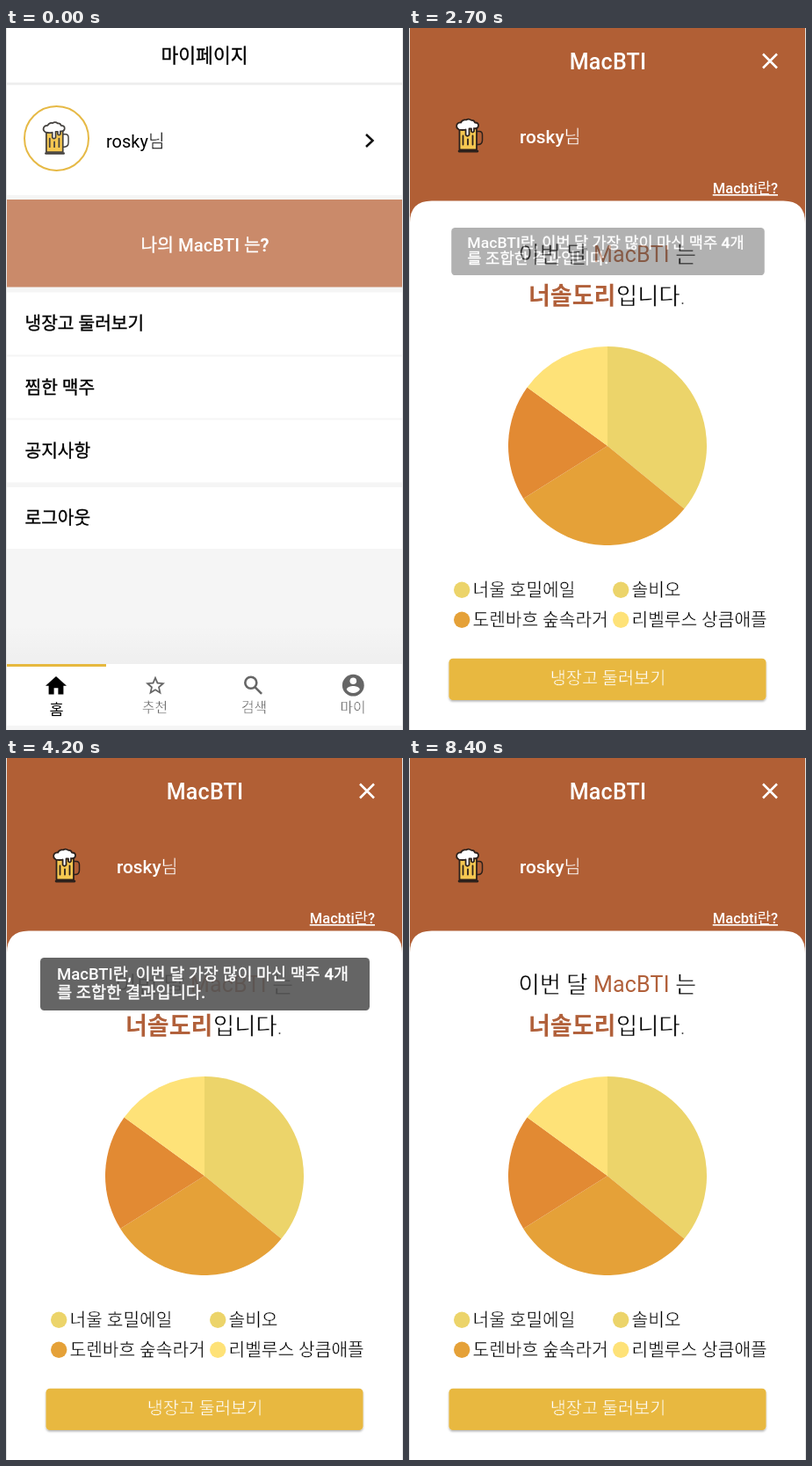
These frames come from a looping animation (452 by 798 pixels, 8.9 s). An HTML page:

```html
<!DOCTYPE html>
<html lang="ko">
<head>
<meta charset="utf-8">
<title>마이페이지</title>
<style>
html, body { margin: 0; width: 100%; height: 100%; overflow: hidden; background: #fff; }
svg { display: block; width: 452px; height: 798px; }
text { font-family: Roboto, "Noto Sans CJK KR", "Noto Sans CJK JP", sans-serif; font-size: 20.3px; }
.mid { text-anchor: middle; }
.end { text-anchor: end; }
/* a stroke in the background colour thins the strokes of the letters */
.light { font-weight: 300; stroke: var(--bg, #fff); stroke-width: .45px; }
.med { font-weight: 500; stroke: currentColor; stroke-width: .35px; }
.plain { stroke: none; }
.white { fill: #fff; color: #fff; }
.brown { fill: #b1603a; }
.big { font-size: 26.3px; }
.lat { font-size: 25px; letter-spacing: .2px; }
.nav { font-size: 15.8px; fill: #555; }
.line { fill: none; stroke: #fff; stroke-width: 2.5; }
</style>
</head>
<body>
<svg viewBox="0 0 452 798">
  <defs>
    <linearGradient id="shade" x2="0" y2="1">
      <stop offset="0" stop-color="#000" stop-opacity="0"/>
      <stop offset="1" stop-color="#000" stop-opacity=".025"/>
    </linearGradient>
    <filter id="drop" x="-5%" y="-20%" width="110%" height="150%">
      <feDropShadow dx="0" dy="1.6" stdDeviation="1.3" flood-opacity=".3"/>
    </filter>
    <symbol id="mug" viewBox="0 0 32 40" overflow="visible">
      <g stroke="currentColor" stroke-width="1.8" stroke-linejoin="round" stroke-linecap="round">
        <path d="M24 15h3q3.500 0 3.500 4v6q0 5-5 5H24" fill="none" stroke-width="1.500"/>
        <path d="M4.500 10h19.500v26H4.500z" fill="#f6c851"/>
        <path d="M4 37.600h21" stroke-width="2.600"/>
        <path d="M8.500 20v10M14 24v6M19.500 20v10" stroke-width="1.800"/>
        <path d="M4 13Q0 11 1.600 7Q3 4.600 6 5Q8 1 12 2Q15 0 18 2.400Q21 2 22 5Q26.500 5 26 9Q25 12.500 21 11.500V15Q19.500 17 18 15V12H15.500V19Q13.500 21.500 11.600 19V13Q8 14 4 13Z" fill="#fff"/>
      </g>
    </symbol>
  </defs>

  <g id="home">
    <rect width="452" height="798" fill="#f5f5f5"/>
    <path d="M1 0h450v62H1zM1 65h450v125H1zM1 300.500h450v71H1zM1 373.500h450v70H1zM1 445.500h450v71H1zM1 522h450v70H1z" fill="#fff"/>
    <rect x="1" y="62" width="450" height="2.500" fill="#eee"/>
    <rect x="1" y="678" width="450" height="45" fill="url(#shade)"/>
    <rect x="1" y="723" width="450" height="70" fill="#fff"/>
    <rect x="1" y="195" width="450" height="99.500" fill="#ca8a6a"/>
    <rect x="1" y="723" width="113" height="3" fill="#e6b83e"/>

    <text class="mid med" x="226" y="38.500" style="font-size:21.500px">마이페이지</text>
    <circle cx="57.500" cy="125.500" r="36.500" fill="none" stroke="#e6b945" stroke-width="2"/>
    <use href="#mug" x="41.500" y="106" width="31" height="39" color="#45423f"/>
    <text class="light" x="114" y="135.500"><tspan class="plain" font-weight="400" font-size="20">rosky</tspan>님</text>
    <path class="line" d="M410 121l7.500 7-7.500 7" style="stroke:#111"/>
    <text class="mid med white" x="226.500" y="253.500">나의 <tspan class="plain">MacBTI</tspan> 는?</text>
    <g class="med">
      <text x="21.500" y="342.500">냉장고 둘러보기</text>
      <text x="21.500" y="415.500">찜한 맥주</text>
      <text x="21.500" y="487.500">공지사항</text>
      <text x="21.500" y="563.500">로그아웃</text>
    </g>

    <path transform="translate(42.600 733.400) scale(1.2)" d="M10 20V14H14V20H19V12H22L12 3L2 12H5V20Z"/>
    <g fill="#666">
      <path transform="translate(156.800 734.300) scale(1.1)" d="M12 15.400L8.240 17.660L9.230 13.380L5.910 10.500L10.290 10.130L12 6.090L13.710 10.130L18.090 10.500L14.770 13.380L15.760 17.660ZM22 9.240L14.810 8.630L12 2L9.190 8.630L2 9.240L7.450 13.970L5.820 21L12 17.270L18.180 21L16.540 13.970Z" fill-rule="evenodd"/>
      <g fill="none" stroke="#666" stroke-width="2.600">
        <circle cx="278.800" cy="744.300" r="6.500"/>
        <path d="M283.600 749.300l7.500 7.500"/>
      </g>
      <circle cx="395.300" cy="747.200" r="12.400"/>
    </g>
    <circle cx="395.300" cy="742.200" r="3.800" fill="#fff"/>
    <path d="M387.800 752c0-2.500 5-3.900 7.500-3.900s7.500 1.400 7.500 3.900a9 9 0 0 1-15 0z" fill="#fff"/>
    <text class="mid" x="57.500" y="780.500" style="font-size:17.500px">홈</text>
    <g class="mid light">
      <text class="nav" x="169.500" y="777.500">추천</text>
      <text class="nav" x="282.500" y="777.500">검색</text>
      <text class="nav" x="395" y="777.500">마이</text>
    </g>
  </g>

  <g id="result">
    <rect width="452" height="798" fill="#fff"/>
    <rect x="1" width="450" height="240" fill="#b15f35"/>
    <path d="M1 798V221.500q0-25 25-25H426q25 0 25 25V798z" fill="#fff"/>
    <text class="mid white lat" x="226.500" y="46.500" font-weight="500">MacBTI</text>
    <path class="line" d="M403 29.500l16 16m0-16l-16 16"/>
    <use href="#mug" x="53" y="102" width="32" height="41" color="#2c211c"/>
    <text class="white light" x="126" y="131" style="font-size:20.800px;--bg:#b15f35"><tspan class="plain" font-weight="500">rosky</tspan>님</text>
    <text class="end white" x="420" y="188" font-weight="500" style="font-size:16.500px" text-decoration="underline">Macbti란?</text>

    <text class="big light" x="124.500" y="267">이번 달</text>
    <text class="lat brown" x="210" y="265.500">MacBTI</text>
    <text class="big light" x="303" y="267">는</text>
    <text class="big brown" x="136" y="313.500" font-weight="700" style="font-size:27px">너솔도리</text>
    <text class="big light" x="236" y="313.500">입니다.</text>

    <g id="pie"></g>
    <g id="legend"></g>
    <rect x="45.500" y="716.700" width="361" height="47.300" rx="4.500" fill="#e8b83f" filter="url(#drop)"/>
    <text class="mid white light" x="226.500" y="746" style="font-size:19.700px;--bg:#e8b83f">냉장고 둘러보기</text>

    <g id="tip">
      <rect x="39" y="227" width="375" height="60" rx="4.500" fill="#555" fill-opacity=".9"/>
      <g class="white med">
        <text x="58" y="252" style="font-size:18.500px"><tspan class="plain">MacBTI</tspan>란, 이번 달 가장 많이 마신 맥주 4개</text>
        <text x="58" y="272.500" style="font-size:18.700px">를 조합한 결과입니다.</text>
      </g>
    </g>
  </g>
  <path d="M.5 0V798M451.500 0V798" stroke="#e4e4e4"/>
</svg>
<script>
const LOOP = 8900, STEP = 100;
const $ = id => document.getElementById(id);

function add(parent, tag, attrs, label) {
  const el = document.createElementNS('http://www.w3.org/2000/svg', tag);
  for (const key in attrs) el.setAttribute(key, attrs[key]);
  if (label) el.textContent = label;
  parent.append(el);
}

function drawPie(cx, cy, r) {
  const slices = [[129.3, '#ecd46a'], [238, '#e5a138'], [306, '#e28a33'], [360, '#fee278']];
  const rim = deg => {
    const a = deg * Math.PI / 180;
    return `${cx + r * Math.sin(a)} ${cy - r * Math.cos(a)}`;
  };
  let from = 0;
  for (const [to, fill] of slices) {
    add($('pie'), 'path', { d: `M${cx} ${cy}L${rim(from)}A${r} ${r} 0 0 1 ${rim(to)}Z`, fill });
    from = to;
  }
}

function drawLegend() {
  const items = [
    ['너울 호밀에일', '#ecd46a'], ['솔비오', '#ecd46a'],
    ['도렌바흐 숲속라거', '#e5a138'], ['리벨루스 상큼애플', '#fee278']
  ];
  items.forEach(([name, fill], i) => {
    const x = 60.2 + i % 2 * 181, y = 638.8 + (i >> 1) * 34;
    add($('legend'), 'circle', { cx: x, cy: y, r: 9.2, fill });
    add($('legend'), 'text', { x: x + 12.3, y: y + 7.2, class: 'light' }, name);
  });
}

const easeOut = x => 1 - (1 - Math.min(1, Math.max(0, x))) ** 3;

function render(t) {
  const onResult = t >= 1600;
  $('home').style.display = onResult ? 'none' : '';
  $('result').style.display = onResult ? '' : 'none';

  const shown = easeOut((t - 2637) / 300) - easeOut((t - 6000) / 300);
  const sx = 0.9 + 0.1 * shown, sy = 0.8 + 0.2 * shown;
  $('tip').setAttribute('opacity', shown);
  $('tip').setAttribute('transform', `translate(226.5 227) scale(${sx} ${sy}) translate(-226.5 -227)`);
}

drawPie(226, 475, 113);
drawLegend();

const start = performance.now();
function tick() {
  const t = (performance.now() - start) % LOOP;
  render(Math.floor(t / STEP) * STEP);
  requestAnimationFrame(tick);
}
tick();
</script>
</body>
</html>
```
